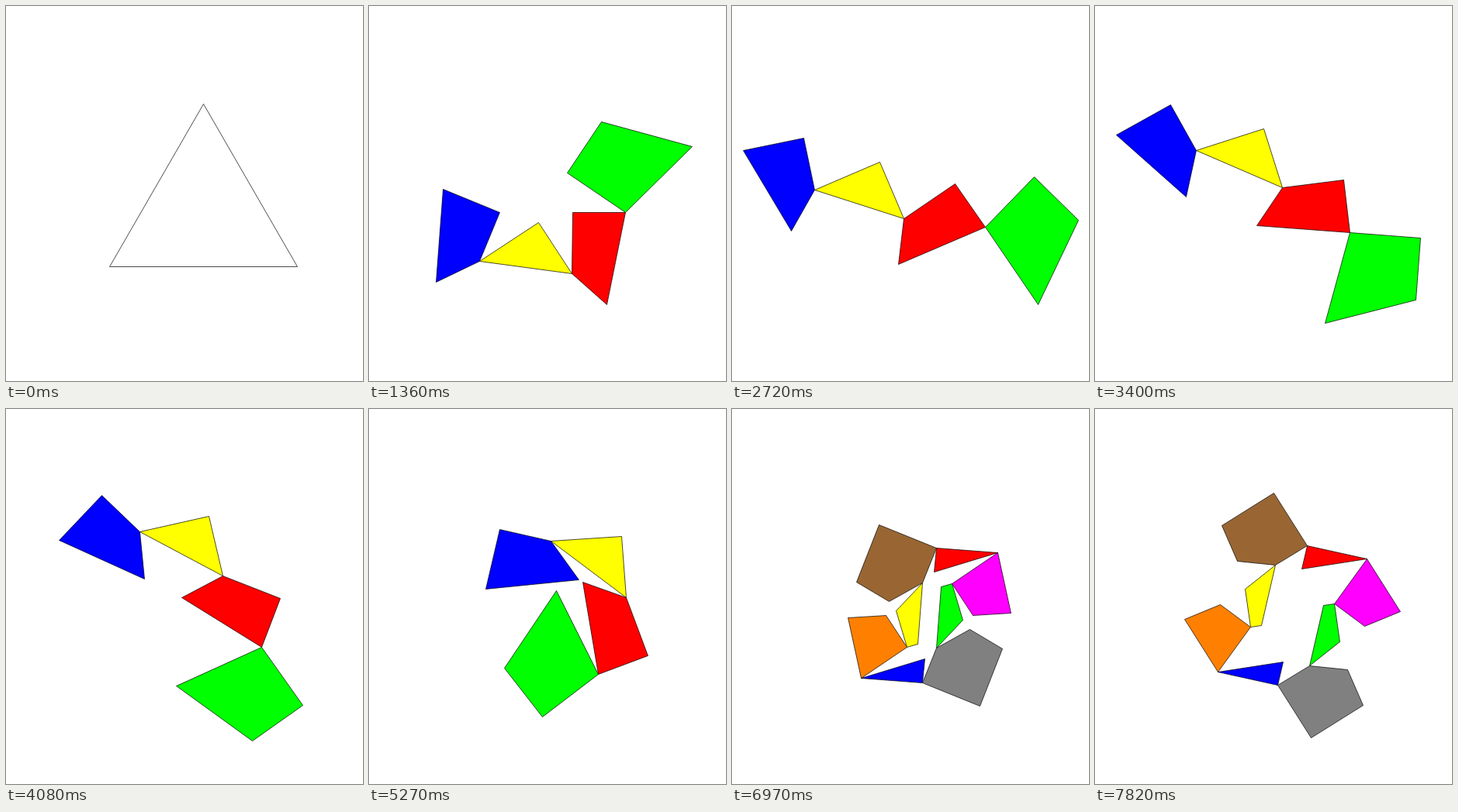
Recreate the animation shown at these times as an HTML page with a canvas. Size 460 by 484 pixels, loop 7.99 s.

```html
<!DOCTYPE html>
<html lang="en">
<head>
<meta charset="utf-8">
<title>Hinged dissections</title>
<style>
  html, body { margin: 0; width: 100%; height: 100%; overflow: hidden; background: #fff; }
  canvas { display: block; }
</style>
</head>
<body>
<canvas id="stage" width="460" height="484"></canvas>
<script>
const ctx = document.getElementById('stage').getContext('2d');
const STEP = 170, STEPS = 47, SWING = 32;
const CENTER = [254.5, 266.5];

// Plane vectors
const add = (p, q) => [p[0] + q[0], p[1] + q[1]];
const sub = (p, q) => [p[0] - q[0], p[1] - q[1]];
const scale = (p, k) => [p[0] * k, p[1] * k];
const neg = p => scale(p, -1);
const dot = (p, q) => p[0] * q[0] + p[1] * q[1];
const polar = (r, a) => [r * Math.cos(a), r * Math.sin(a)];
const rotate = ([x, y], a) => {
  const c = Math.cos(a), s = Math.sin(a);
  return [x * c - y * s, x * s + y * c];
};
const foot = (p, a, b) => {
  const d = sub(b, a);
  return add(a, scale(d, dot(sub(p, a), d) / dot(d, d)));
};

const piece = (color, turn, hinge, points) => ({ color, turn, hinge, points });

// Equilateral triangle and square of equal area, both centred on the origin
const side = 242;
const inradius = side / Math.sqrt(12);
const square = side * Math.sqrt(Math.sqrt(3) / 4);
const half = square / 2;
const apex = [0, -2 * inradius];
const left = [-side / 2, inradius];
const right = [side / 2, inradius];
const triangleOutline = [apex, right, left];
const squareOutline = [[-half, -half], [half, -half], [half, half], [-half, half]];

function triangleToSquare() {
  const midL = scale(add(apex, left), 0.5);
  const midR = scale(add(apex, right), 0.5);
  const rise = 1.5 * inradius;
  const baseL = [midR[0] - Math.sqrt(square ** 2 - rise ** 2), inradius];
  const baseR = add(baseL, [side / 2, 0]);
  const footL = foot(midL, baseL, midR);
  const footR = foot(baseR, baseL, midR);
  return {
    spin: Math.asin(rise / square),
    pieces: [
      piece('#00f', -1, baseL, [left, midL, footL, baseL]),
      piece('#ff0', 0, baseL, [baseL, footR, baseR]),
      piece('#f00', 1, baseR, [baseR, footR, midR, right]),
      piece('#0f0', 2, midR, [midR, footL, midL, apex])
    ]
  };
}

// The square is two equal sheets; the first four pieces fill the left one
function squareToHexagon() {
  const edge = square * Math.sqrt(2 / Math.sqrt(27)) / 2;
  const drop = Math.sqrt(3 * edge ** 2 - half ** 2);
  const tilt = Math.PI / 6 - Math.atan2(drop, half);
  const top = [0, -half], inner = [0, -drop], low = [0, half - drop];
  const mid = [-half, 0], corner = [-half, half];
  const joint = add(mid, polar(edge, tilt));
  const tip = add(joint, polar(edge, tilt + Math.PI / 3));
  const pentagon = [[-half, -half], top, inner, joint, mid];
  const kite = [mid, joint, tip, corner];
  const sliver = [inner, low, tip, joint];
  const wedge = [corner, low, [0, half]];
  const opposite = points => points.map(neg);
  return {
    spin: Math.PI / 3 - tilt,
    pieces: [
      piece('#00f', 0, neg(top), wedge),
      piece('#ff8000', -1, corner, kite),
      piece('#ff0', 0, tip, sliver),
      piece('#963', 1, inner, pentagon),
      piece('#f00', 0, top, opposite(wedge)),
      piece('#f0f', -1, neg(corner), opposite(kite)),
      piece('#0f0', 0, neg(tip), opposite(sliver)),
      piece('#808080', 1, neg(inner), opposite(pentagon))
    ]
  };
}

// Area and area-weighted centre of a polygon
function moment(points) {
  let area = 0, sum = [0, 0];
  points.forEach((p, i) => {
    const q = points[(i + 1) % points.length];
    const cross = p[0] * q[1] - q[0] * p[1];
    area += cross / 2;
    sum = add(sum, scale(add(p, q), cross / 6));
  });
  return { area: Math.abs(area), sum: scale(sum, Math.sign(area)) };
}

// Swing every hinge by the same angle, keeping the centre of mass in place
function pose({ pieces, spin }, progress) {
  let shift = [0, 0], lastAngle = 0;
  const placed = pieces.map(({ color, turn, hinge, points }, i) => {
    const angle = progress * (turn * Math.PI + spin);
    if (i) shift = add(shift, sub(rotate(hinge, lastAngle), rotate(hinge, angle)));
    lastAngle = angle;
    return { color, points: points.map(p => add(rotate(p, angle), shift)) };
  });
  let area = 0, sum = [0, 0];
  for (const { points } of placed) {
    const m = moment(points);
    area += m.area;
    sum = add(sum, m.sum);
  }
  const center = scale(sum, 1 / area);
  return placed.map(({ color, points }) => ({ color, points: points.map(p => sub(p, center)) }));
}

// One path for all polygons, so that shared edges are inked once
function drawPolygons(polygons, fill) {
  ctx.beginPath();
  for (const points of polygons) {
    points.forEach((p, i) => {
      const [x, y] = add(p, CENTER).map(v => Math.floor(v) + 0.5);
      if (i) ctx.lineTo(x, y);
      else ctx.moveTo(x, y);
    });
    ctx.closePath();
  }
  if (fill) {
    ctx.fillStyle = fill;
    ctx.fill();
  }
  ctx.stroke();
}

function drawPieces(dissection, progress) {
  for (const { color, points } of pose(dissection, progress)) drawPolygons([points], color);
}

function drawCuts(dissection, progress) {
  const polygons = pose(dissection, progress).map(p => p.points);
  for (let i = 0; i < polygons.length; i += 4) drawPolygons(polygons.slice(i, i + 4));
}

// Plain outline, cut lines, swing, cut lines of the new shape
function drawAct(dissection, outline, step) {
  const swing = step - 2;
  if (step === 0) drawPolygons([outline]);
  else if (swing < 0) drawCuts(dissection, 0);
  else if (swing <= SWING) drawPieces(dissection, swing / SWING);
  else drawCuts(dissection, 1);
}

const ACT = SWING + 4;
const first = triangleToSquare();
const second = squareToHexagon();
let shown = -1;

function render(now) {
  const step = Math.floor(now / STEP) % STEPS;
  if (step === shown) return;
  shown = step;
  ctx.fillStyle = '#fff';
  ctx.fillRect(0, 0, 460, 484);
  ctx.strokeStyle = '#000';
  ctx.lineWidth = 0.7;
  ctx.lineJoin = 'bevel';
  if (step < ACT) drawAct(first, triangleOutline, step);
  else drawAct(second, squareOutline, step - ACT);
}

const start = performance.now();
function tick() {
  render(performance.now() - start);
  requestAnimationFrame(tick);
}
tick();
</script>
</body>
</html>
```
